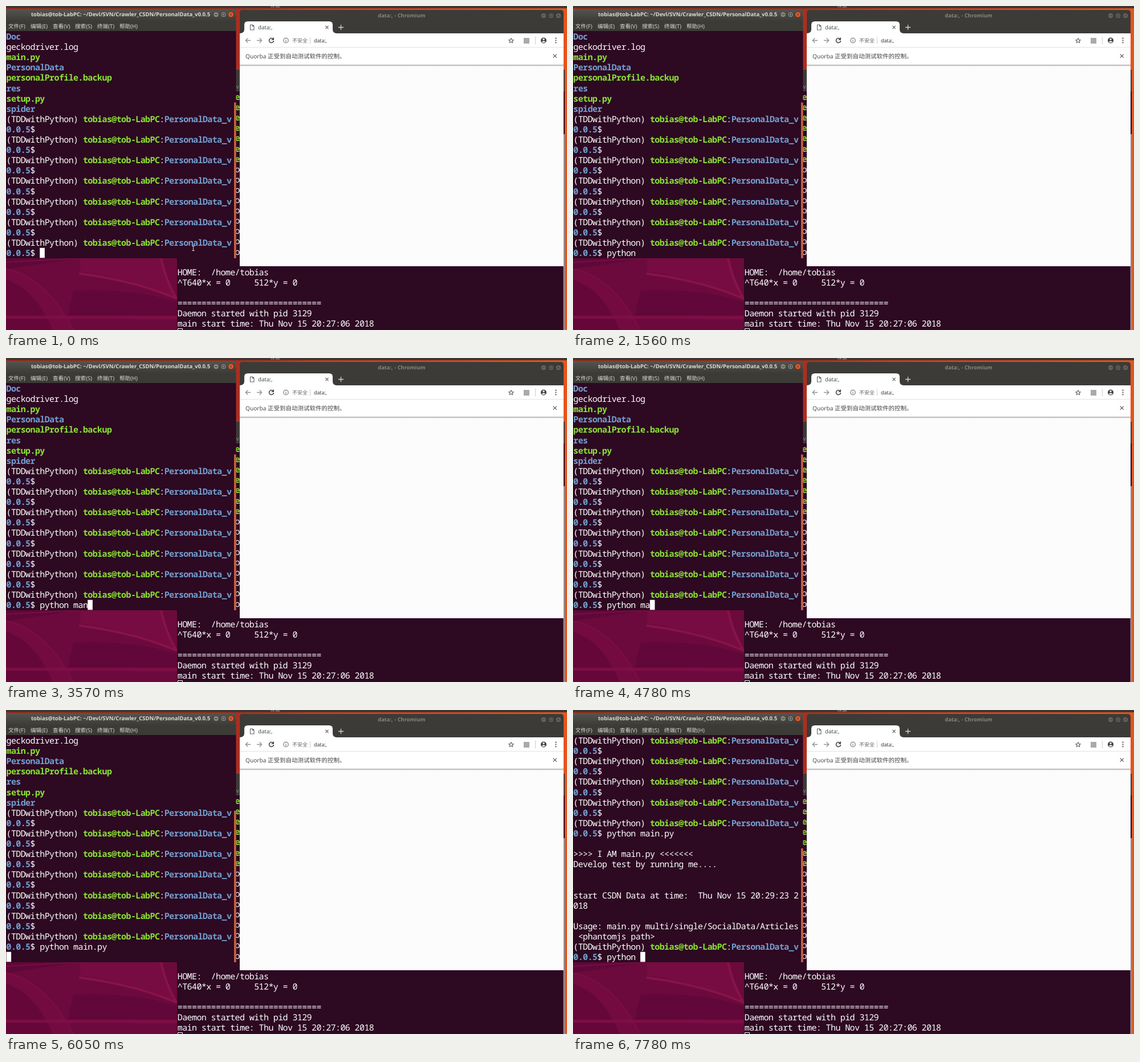
Animation, 984 px wide and 569 px high, one loop 8000 ms. Source, as an HTML page:

```html
<!DOCTYPE html>
<html lang="zh">
<head>
<meta charset="utf-8">
<title>Terminal session</title>
<style>
  html, body { margin: 0; width: 100%; height: 100%; overflow: hidden; background: #2d0922; }
  svg { display: block; width: 100vw; height: 100vh; }
  text { white-space: pre; text-rendering: geometricPrecision; }
  .ui { font-family: 'Open Sans', 'Noto Sans CJK SC', 'Noto Sans CJK', sans-serif; }
  .mono { font: 15px 'Noto Sans Mono', 'DejaVu Sans Mono', monospace; letter-spacing: -.6px; fill: #fff; }
  .g { fill: #8ae234; font-weight: 700; }
  .b { fill: #729fcf; font-weight: 700; }
  .bold { font-weight: 700; }
  .line { fill: none; stroke-linecap: round; stroke-linejoin: round; }
</style>
</head>
<body>
<svg viewBox="0 0 984 569" preserveAspectRatio="none">
  <defs>
    <linearGradient id="desk">
      <stop offset=".4" stop-color="#a82d20"/>
      <stop offset=".55" stop-color="#c83c1c"/>
      <stop offset="1" stop-color="#e5541d"/>
    </linearGradient>
    <linearGradient id="bar" x2="0" y2="1">
      <stop offset="0" stop-color="#55534d"/>
      <stop offset="1" stop-color="#3c3b37"/>
    </linearGradient>
    <linearGradient id="shade" x2="0" y2="1">
      <stop offset="0" stop-color="#a9a9a9"/>
      <stop offset="1" stop-color="#fcfcfc"/>
    </linearGradient>
    <clipPath id="corner"><path d="M0 443H300V569H0Z"/></clipPath>
  </defs>

  <!-- desktop -->
  <path fill="url(#desk)" d="M0 0H984V569H0Z"/>
  <path fill="#3b3934" d="M0 0H984V4H0Z"/>
  <text class="ui" x="463" y="2" font-size="9" fill="#aaa69d">设置</text>
  <g clip-path="url(#corner)">
    <path fill="#6c0a3d" d="M0 443H300V569H0Z"/>
    <path fill="#600739" d="M0 443H130Q66 452 0 462Z"/>
    <path fill="#740b40" d="M0 462Q70 475 118 569H0Z"/>
    <path fill="#650839" d="M0 480Q52 497 82 569H0Z"/>
    <path fill="#760c42" d="M130 443H272Q283 480 300 512Q220 478 130 466Z"/>
    <path fill="#620739" d="M118 500Q220 494 300 520V546H108Z"/>
    <path fill="#7c0f45" d="M0 544L300 544V550L0 549Z"/>
    <path class="line" stroke="#871348" stroke-width="4" d="M130 470Q225 482 300 514M272 443Q280 482 298 512"/>
    <path class="line" stroke="#7e1046" stroke-width="1.5" d="M0 462Q70 475 118 569M0 450L130 443"/>
  </g>

  <!-- rear terminal -->
  <path fill="#3c3b37" d="M400 112H980V150H400Z"/>
  <path fill="#2d0922" d="M300 440H980V569H300ZM400 150H980V450H400Z"/>
  <path fill="#918b8c" d="M977.500 225H980.500V569H977.500Z"/>
  <text class="ui" x="403.500" y="145" font-size="10" fill="#8f8d86">v</text>
  <g class="mono" id="rear"></g>
  <path class="line" stroke="#fff" d="M301.500 569V566.500H309.500V569"/>

  <!-- front terminal -->
  <path fill="#2d0922" d="M0 43H403.500V443H0Z"/>
  <path fill="url(#bar)" d="M0 6H399Q403.500 6 403.500 11V27H0Z"/>
  <path fill="#3c3b37" d="M0 26H403.500V44H0Z"/>
  <text class="ui bold" x="44" y="18.300" font-size="9.500" fill="#dfdbd2">tobias@tob-LabPC: ~/Devl/SVN/Crawler_CSDN/PersonalData_v0.0.5</text>
  <g class="ui" id="menu" font-size="9.600" fill="#dfdbd2"></g>
  <g class="buttons" fill="#85837b" stroke="#2f2e2b" stroke-width=".8">
    <circle cx="368.500" cy="15" r="5"/>
    <circle cx="381.500" cy="15" r="5"/>
    <circle cx="394.500" cy="15" r="5" fill="#ec5a29"/>
  </g>
  <path class="line" stroke="#3c3b37" d="M366.500 15H370.500M379.500 13H383.500V17H379.500ZM392.700 13.200L396.300 16.800M396.300 13.200L392.700 16.800"/>
  <g class="mono" id="rows"></g>
  <rect id="thumb" x="400" width="3.600" fill="#c8623c"/>
  <rect id="cursor" width="8.600" height="17.500" fill="#fff"/>
  <path id="beam" class="line" stroke="#d8d4d6" d="M326.500 421.500H330.500M328.500 421.500V429.500M326.500 429.500H330.500"/>

  <!-- browser -->
  <path fill="#3c3b37" d="M410 457V12Q410 7 415 7H973Q978 7 978 12V457Z"/>
  <text class="ui bold" x="694" y="20.200" font-size="9.300" fill="#87857d" text-anchor="middle">data:, - Chromium</text>
  <g fill="#66645d" stroke="#302f2b" stroke-width=".8">
    <circle cx="943" cy="17" r="4.800"/>
    <circle cx="956" cy="17" r="4.800"/>
    <circle cx="969" cy="17" r="4.800"/>
  </g>
  <path class="line" stroke="#3c3b37" d="M941 17H945M954 15H958V19H954ZM967.200 15.200L970.800 18.800M970.800 15.200L967.200 18.800"/>
  <path fill="#fff" d="M410 48Q418 48 418 41V33Q418 27 424 27H567Q573 27 573 33V41Q573 48 580 48H978V104H410Z"/>
  <path fill="#fcfcfc" d="M410 104H978V457H410Z"/>
  <path fill="#e2e2e2" d="M410 72H978V73H410Z"/>
  <path fill="url(#shade)" d="M410 103H978V106.500H410Z"/>
  <g class="line" stroke="#5f6368" stroke-width="1.100">
    <path d="M428.500 33H432.500L435 35.500V42H428.500ZM432.500 33V35.500H435"/>
    <path d="M560.700 35L565.300 39.600M565.300 35L560.700 39.600"/>
    <path stroke="#d5d3ce" stroke-width="1.300" d="M583.500 37.500H591.500M587.500 33.500V41.500"/>
    <path stroke="#909397" stroke-width="1.300" d="M428.500 60.500H420.500M424 56.800L420.300 60.500L424 64.200"/>
    <path stroke="#909397" stroke-width="1.300" d="M440.500 60.500H448.500M445 56.800L448.700 60.500L445 64.200"/>
    <path stroke="#3e4145" stroke-width="1.500" d="M468.600 58A4 4 0 1 0 469.400 61.500M469.300 56V59H466.300"/>
    <circle cx="491" cy="60.500" r="4.200"/>
    <path d="M491 60.200V62.800M491 58.300V58.400"/>
    <path stroke="#cfcfcf" d="M533.500 55V66M928.500 54V67"/>
    <path d="M886 56.400L887.200 59.300L890.300 59.500L887.900 61.500L888.700 64.600L886 62.900L883.300 64.600L884.100 61.500L881.700 59.500L884.800 59.300Z"/>
    <path d="M960 85L965.500 90.500M965.500 85L960 90.500"/>
  </g>
  <path fill="#a9a9a9" d="M908 56H918V66H908Z"/>
  <g fill="#3e4145">
    <circle cx="943" cy="60.500" r="5"/>
    <circle cx="964.500" cy="56.700" r="1.100"/>
    <circle cx="964.500" cy="60.500" r="1.100"/>
    <circle cx="964.500" cy="64.300" r="1.100"/>
  </g>
  <path fill="#fff" d="M941.300 58.500A1.700 1.700 0 1 1 944.700 58.500A1.700 1.700 0 1 1 941.300 58.500M939.800 62.800Q943 60.300 946.200 62.800Q943 66 939.800 62.800"/>
  <g class="ui" fill="#3c4043">
    <text x="442" y="41" font-size="9.800">data:,</text>
    <text x="502" y="64" font-size="9" fill="#5f6368">不安全</text>
    <text x="540" y="64" font-size="8.800" fill="#202124">data:,</text>
    <text x="420" y="91.600" font-size="10.200">Quorba</text>
    <text x="459" y="91.600" font-size="10.500">正受到自动测试软件的控制。</text>
  </g>
</svg>
<script>
const LOOP = 8000, CELL = 8.4, PITCH = 18.1, ROWS = 22;
const $ = id => document.getElementById(id);
const esc = s => s.replace(/&/g, '&amp;').replace(/</g, '&lt;');
const span = (cls, s) => `<tspan class="${cls}">${s}</tspan>`;
const text = (x, y, s) => `<text x="${x}" y="${y.toFixed(1)}">${s}</text>`;

const dir = s => span('b', s), exe = s => span('g', s);
const prompt = ['(TDDwithPython) ' + exe('tobias@tob-LabPC') + ':' + dir('PersonalData_v'), dir('0.0.5') + '$ '];
const history = [
  dir('Doc'), 'geckodriver.log', exe('main.py'), dir('PersonalData'),
  exe('personalProfile.backup'), dir('res'), exe('setup.py'), dir('spider'),
  ...Array(7).fill(prompt).flat()
];
const output = [
  '', '>>>> I AM main.py <<<<<<<', 'Develop test by running me....', '', '',
  'start CSDN Data at time:  Thu Nov 15 20:29:23 2', '018', '',
  'Usage: main.py multi/single/SocialData/Articles', ' <phantomjs path>'
].map(esc);

const done = [...history.slice(0, -1), prompt[1] + 'python main.py'];
// waiting for input, running, finished
const stages = [
  { lines: history, thumb: 169.5 },
  { lines: [...done, ''], thumb: 177 },
  { lines: [...done, ...output, ...prompt], thumb: 243 }
];

// start time, typed text, cursor shown, stage
const steps = [
  [0, '', 1, 0], [400, 'p', 1, 0], [540, 'py', 1, 0], [670, 'pyth', 1, 0],
  [820, 'pytho', 1, 0], [970, 'python ', 1, 0], [1560, 'python ', 0, 0],
  [2160, 'python ', 1, 0], [2740, 'python ', 0, 0], [3300, 'python m', 1, 0],
  [3450, 'python ma', 1, 0], [3570, 'python man', 1, 0], [4320, 'python man', 0, 0],
  [4630, 'python man', 1, 0], [4780, 'python ma', 1, 0], [4930, 'python mai', 1, 0],
  [5340, 'python main.py ', 1, 0], [5900, 'python main.py ', 0, 0],
  [6050, '', 1, 1], [6520, '', 0, 2], [7230, 'p', 1, 2], [7360, 'py', 1, 2],
  [7510, 'pyth', 1, 2], [7660, 'pytho', 1, 2], [7780, 'python ', 1, 2]
];

$('menu').innerHTML = ['文件(F)', '编辑(E)', '查看(V)', '搜索(S)', '终端(T)', '帮助(H)']
  .map((s, i) => text(4 + 39 * i, 38.5, s)).join('');

const edge = Array.from({ length: 16 }, (_, i) =>
  text(401.5, 165 + PITCH * i, i < 7 ? exe('e') : 'o'));
const log = ['HOME:  /home/tobias', '^T640*x = 0     512*y = 0', '', '='.repeat(30),
  'Daemon started with pid 3129', 'main start time: Thu Nov 15 20:27:06 2018']
  .map((s, i) => text(300.8, 472.8 + PITCH * i, s));
$('rear').innerHTML = [...edge, ...log].join('');

let shown = null;

function draw(t) {
  $('beam').style.display = t < 280 ? '' : 'none';
  const step = steps.findLast(s => s[0] <= t);
  if (step === shown) return;
  shown = step;
  const [, typed, cursor, index] = step;
  const { lines, thumb } = stages[index];
  const view = lines.slice(-ROWS);
  view[ROWS - 1] += typed;
  $('rows').innerHTML = view.map((s, i) => text(.5, 59 + PITCH * i, s)).join('');
  $('thumb').setAttribute('y', thumb);
  $('thumb').setAttribute('height', 443 - thumb);
  const col = index === 1 ? 0 : 7 + typed.length;
  $('cursor').setAttribute('x', .5 + CELL * col);
  $('cursor').setAttribute('y', 424.8);
  $('cursor').style.display = cursor ? '' : 'none';
}

const start = performance.now();
function tick() {
  draw((performance.now() - start) % LOOP);
  requestAnimationFrame(tick);
}
tick();
</script>
</body>
</html>
```
